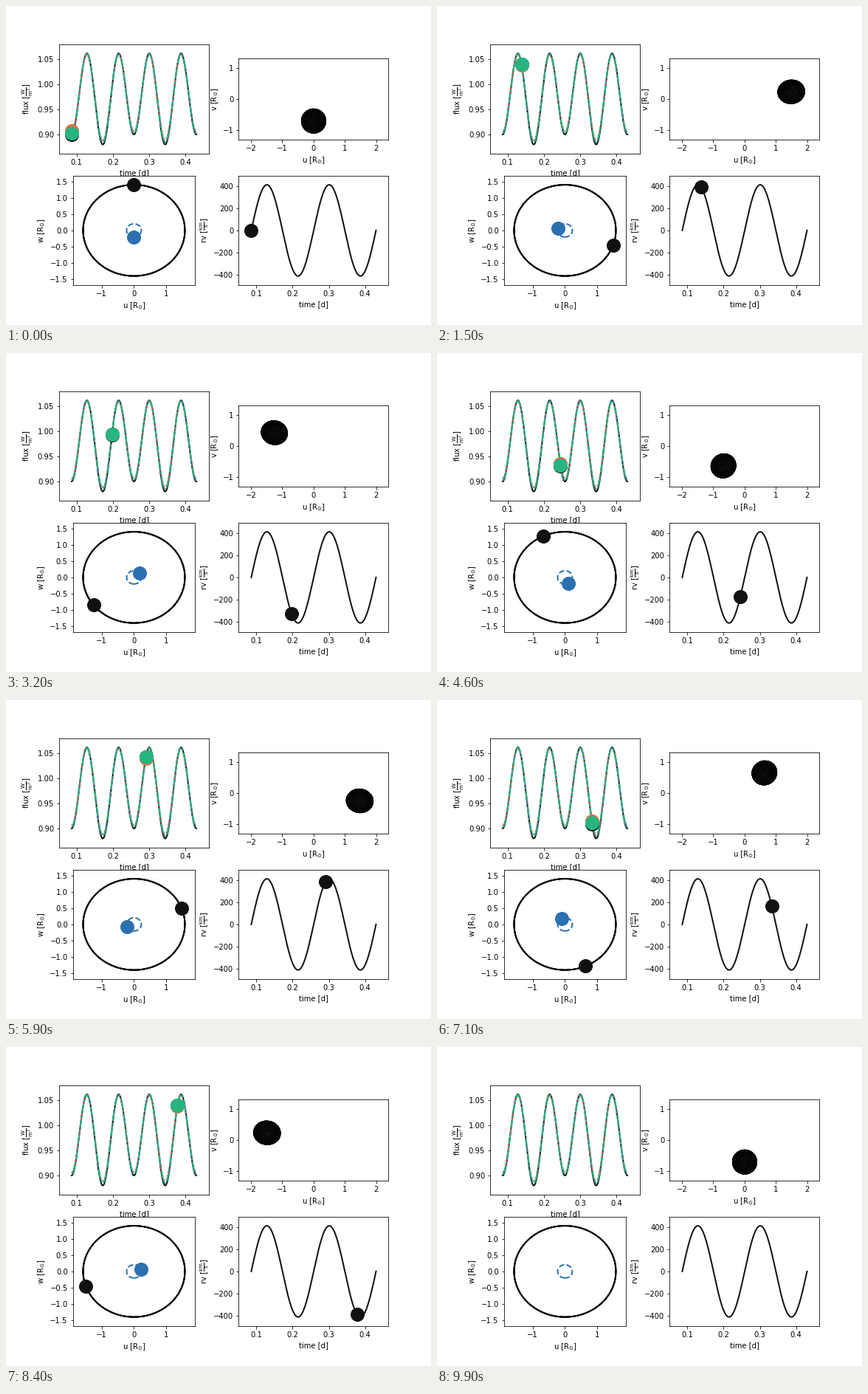
Recreate the animation shown at these times as a matplotlib script. Size 576 by 432 pixels, loop 10000 ms.

```python
import numpy as np
import matplotlib.pyplot as plt
from matplotlib.animation import FuncAnimation
from matplotlib.collections import PolyCollection
from matplotlib.tri import Triangulation

FRAMES = 100
PERIOD = 0.172
T0 = PERIOD / 2
A1, A2 = 1.575, 0.228          # orbit radii
SIN_I = 1.41 / A1
COS_I = np.sqrt(1 - SIN_I ** 2)
RV_AMP = 413
SHAPE = np.array([0.435, 0.39, 0.375])   # star semi-axes
BLACK, BLUE, ORANGE, GREEN = "#111111", "#2b70b0", "#f06a3a", "#26b580"

plt.rcParams["font.family"] = "DejaVu Sans"
fig, ((ax_lc, ax_uv), (ax_uw, ax_rv)) = plt.subplots(2, 2, figsize=(8, 6), dpi=72)
fig.subplots_adjust(left=0.125, right=0.9, bottom=0.125, top=0.88,
                    wspace=0.2, hspace=0.2)


def flux(theta, first, second, top):
    """Ellipsoidal light curve through two unequal minima and a maximum."""
    low, diff = (first + second) / 2, (first - second) / 2
    return (top + low) / 2 - (top - low) / 2 * np.cos(2 * theta) + diff * np.cos(theta)


def orbit(theta, radius):
    return radius * np.sin(theta), radius * SIN_I * np.cos(theta)


def setup(ax, xlabel, ylabel, xlim, ylim, equal=False):
    ax.set(xlabel=xlabel, ylabel=ylabel, xlim=xlim, ylim=ylim)
    if equal:
        ax.set_aspect("equal", adjustable="box")


def dot(ax, color):
    return ax.plot([], [], "o", ms=18, color=color, zorder=5)[0]


def star_mesh(n=750):
    """Spiral points on a unit sphere, joined into triangles."""
    k = np.arange(n) + 0.5
    z = 1 - 2 * k / n
    phi = k * np.pi * (3 - np.sqrt(5))
    r = np.sqrt(1 - z * z)
    pts = np.column_stack([r * np.cos(phi), r * np.sin(phi), z])
    flat = pts[:, :2] / (1 + z)[:, None]
    return pts, Triangulation(flat[:, 0], flat[:, 1]).triangles


theta = np.linspace(0, 4 * np.pi, 401)
time = T0 + theta / (2 * np.pi) * PERIOD
t_lim = (T0 - 0.2 * PERIOD, T0 + 2.2 * PERIOD)
R = r"[$\mathrm{R_{\odot}}$]"

setup(ax_lc, "time [d]", r"flux [$\mathrm{\frac{W}{m^{2}}}$]", t_lim, (0.8616, 1.0796))
setup(ax_uv, "u " + R, "v " + R, (-2.39, 2.39), (-1.296, 1.296), True)
setup(ax_uw, "u " + R, "w " + R, (-1.2 * A1, 1.2 * A1), (-1.692, 1.692), True)
setup(ax_rv, "time [d]", r"rv [$\mathrm{\frac{km}{s}}$]", t_lim,
      (-1.2 * RV_AMP, 1.2 * RV_AMP))

curves = [
    (BLACK, "-", (0.900, 0.880, 1.0614)),
    (BLUE, "--", (0.9035, 0.885, 1.0600)),
    (ORANGE, ":", (0.9070, 0.889, 1.0575)),
    (GREEN, "-.", (0.9030, 0.885, 1.0600)),
]
lc_dots = []
for color, style, levels in curves:
    ax_lc.plot(time, flux(theta, *levels), style, color=color, lw=2)
    lc_dots.append(dot(ax_lc, color))

ax_uw.plot(*orbit(theta, A1), color=BLACK, lw=2)
ax_uw.plot(*orbit(theta[:201], -A2), "--", color=BLUE, lw=2)
uw_dots = [dot(ax_uw, BLACK), dot(ax_uw, BLUE)]
ax_rv.plot(time, RV_AMP * np.sin(theta), color=BLACK, lw=2)
rv_dot = dot(ax_rv, BLACK)

points, triangles = star_mesh()
normals = (points / SHAPE)[triangles].mean(axis=1)
star = PolyCollection([], facecolors="white", edgecolors="black", linewidths=1)
ax_uv.add_collection(star, autolim=False)


def update(i):
    frac = i / (FRAMES - 1)
    th = 4 * np.pi * frac
    t = T0 + 2 * PERIOD * frac
    s, c = np.sin(th), np.cos(th)

    # body axes (radial, along the orbit, normal) in u, v, w
    axes = np.array([[s, -COS_I * c, SIN_I * c],
                     [c, COS_I * s, -SIN_I * s],
                     [0, SIN_I, COS_I]])
    xyz = (points * SHAPE) @ axes + A1 * axes[0]
    tris = triangles[(normals @ axes)[:, 2] > 0]
    tris = tris[np.argsort(xyz[tris, 2].mean(axis=1))]
    star.set_verts(xyz[tris, :2])

    for d, (_, _, levels) in zip(lc_dots, curves):
        d.set_data([t], [flux(th, *levels)])
    for d, radius in zip(uw_dots, (A1, -A2)):
        u, w = orbit(th, radius)
        d.set_data([u], [w])
    rv_dot.set_data([t], [RV_AMP * s])

    dots = [*lc_dots, *uw_dots, rv_dot]
    for d in dots:
        d.set_visible(i < FRAMES - 1)
    return [star, *dots]


anim = FuncAnimation(fig, update, frames=FRAMES, interval=100,
                     repeat=True, repeat_delay=0, blit=False)
plt.show()
```
